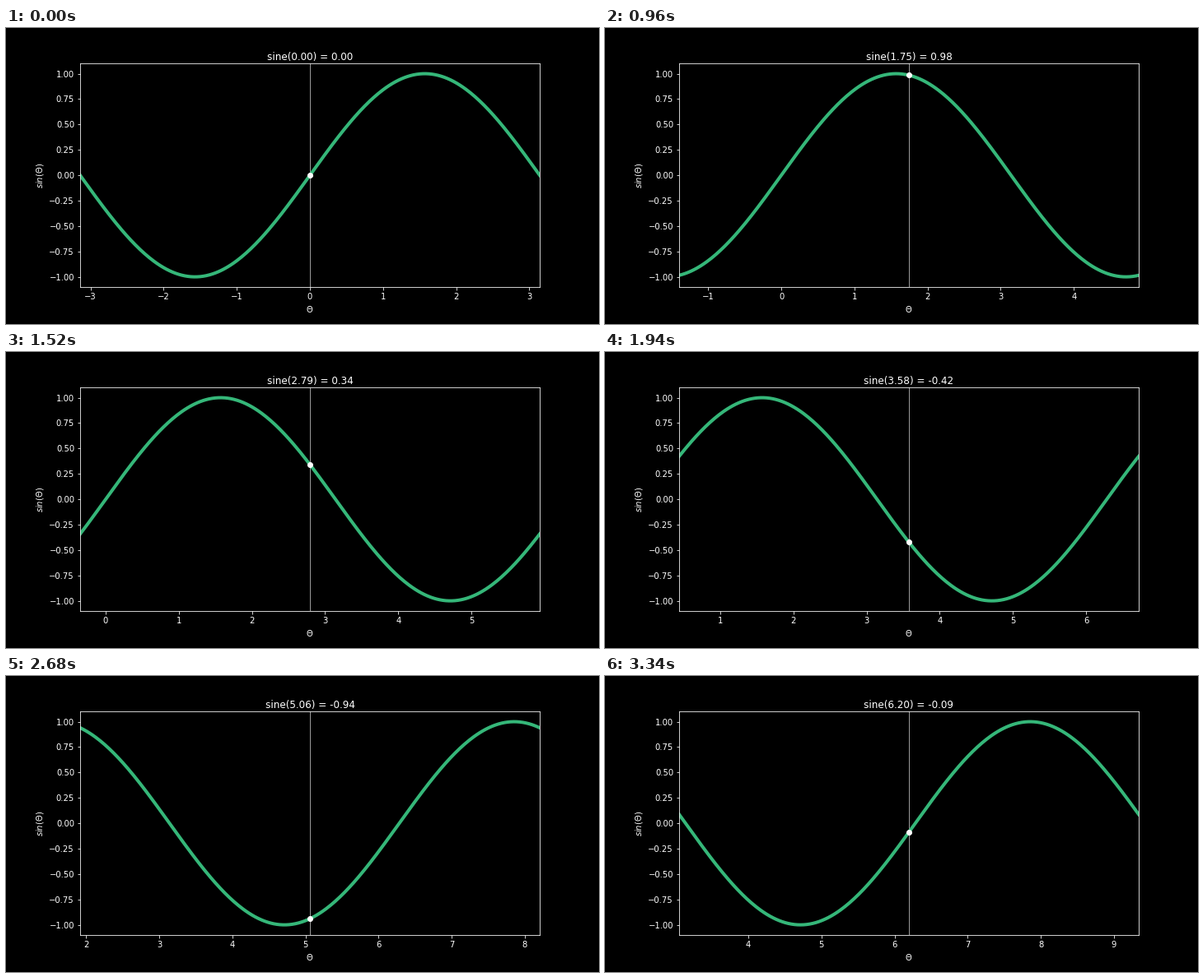
A matplotlib script that plays this animation: 720x360 px, repeating every 3.44 s.

```python
import numpy as np
import matplotlib.pyplot as plt
from matplotlib.animation import FuncAnimation

STEPS = 72       # poses in one full turn
TICK_MS = 20
HOLD_TICKS = 5   # every third pose and the last one linger

plt.style.use("dark_background")
plt.rcParams["font.family"] = "DejaVu Sans"

fig, ax = plt.subplots(figsize=(10, 5), dpi=72)
fig.subplots_adjust(left=0.125, right=0.9, bottom=0.125, top=0.88)
ax.set_ylim(-1.1, 1.1)
ax.set_xlabel(r"$\Theta$")
ax.set_ylabel(r"$sin(\Theta)$")

title = ax.set_title("", fontsize=12, pad=4)
cursor = ax.axvline(0, color="white", lw=0.6, zorder=1.5)
curve, = ax.plot([], [], color="#35b779", lw=4)
dot, = ax.plot([], [], "o", color="white", ms=6, zorder=4)


def draw(step):
    theta = 2 * np.pi * step / STEPS
    xs = np.linspace(theta - np.pi, theta + np.pi, 300)
    curve.set_data(xs, np.sin(xs))
    cursor.set_xdata([theta, theta])
    dot.set_data([theta], [np.sin(theta)])
    ax.set_xlim(xs[0], xs[-1])
    title.set_text(f"sine({theta:.2f}) = {np.sin(theta):.2f}")
    return curve, cursor, dot, title


steps = np.arange(STEPS)
holds = np.where((steps % 3 == 1) | (steps == STEPS - 1), HOLD_TICKS, 1)
timeline = np.repeat(steps, holds)

anim = FuncAnimation(fig, draw, frames=timeline, interval=TICK_MS,
                     repeat=True, repeat_delay=0, cache_frame_data=False)
plt.show()
```
